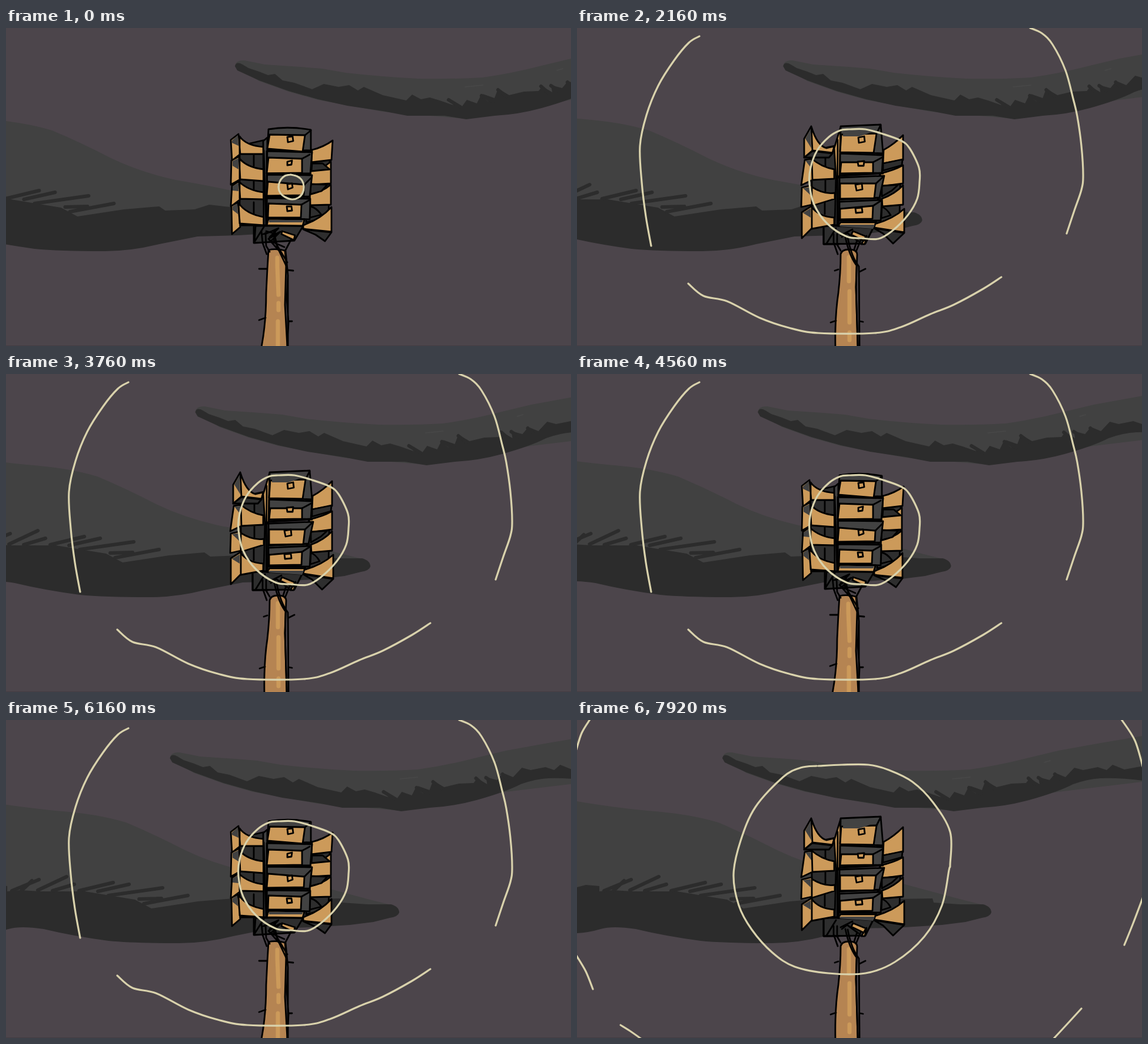
An HTML page for the animation above (8000 ms loop, 960 by 540 pixels).

```html
<!DOCTYPE html>
<html lang="en">
<head>
<meta charset="utf-8">
<title>Siren tower</title>
<style>
html, body { margin: 0; width: 100%; height: 100%; overflow: hidden; background: #4c454b; }
svg { display: block; width: 960px; height: 540px; }
path { stroke-linecap: round; stroke-linejoin: round; }
.tower path { stroke: #000; stroke-width: 2.8; fill: none; }
.tower .wood { fill: #cc9a5a; }
.tower .dark { fill: #2e2e2e; }
.tower .grey { fill: #424242; }
.tower .pole { fill: #b58452; }
.tower .shine { stroke: #cc9a5a; stroke-width: 7; }
.tower .shade { stroke: none; fill: #424242; }
#rings path { fill: none; stroke: #d9d2ac; stroke-width: 3.2; vector-effect: non-scaling-stroke; }
</style>
</head>
<body>
<svg viewBox="0 0 960 540">
  <rect width="960" height="540" fill="#4c454b"/>
  <rect y="539" width="960" height="1" fill="#433d42"/>

  <g id="low">
    <path fill="#414141" d="M0 138Q50 147 120 154Q190 159 240 174Q290 195 340 221Q390 245 450 258Q520 270 557 279L650 304 690 314 600 330 0 330Z"/>
    <path fill="#2c2c2c" d="M0 284L15 280 38 282 38 291 60 289 95 291 170 291 200 296 255 305 283 320 362 308 422 303 432 310 482 308 507 300 542 304 604 303 606 310 650 313 690 313Q704 317 704 327Q702 334 688 336L660 343 620 348 557 352 487 354 422 367Q375 379 330 379Q250 379 210 375Q150 367 100 355Q60 349 40 355Q20 361 0 362Z"/>
    <path fill="none" stroke="#2c2c2c" stroke-width="6" d="M46 290L92 271M62 290L80 273M90 289L139 266M115 290L152 279M160 290L218 276M192 291L245 279M210 298L302 285M270 312L345 298M262 304L300 303"/>
  </g>

  <g id="high">
    <path fill="#414141" d="M389 65Q390 54 405 55L440 62 500 66 537 69 577 76Q640 83 700 86Q760 87 810 84Q860 77 910 64L960 52 1032 39 1110 26V104L960 122 780 154 640 142 530 122 480 108 430 90Z"/>
    <path fill="#2c2c2c" d="M389 65Q391 56 402 62L412 68 430 74 445 80 457 78 470 89 490 93 520 104 540 95 565 100 583 97 598 106 608 100 640 114 680 123 690 113 705 121 720 118 737 123 760 131 752 120 775 133 783 122 800 128 806 116 820 125 810 112 830 119 836 103 855 114 880 108 905 107 911 99 928 109 926 97 945 102 955 90 972 97 987 81 1002 85 1027 80 1042 85 1052 76 1072 84 1110 77V104Q1070 98 1032 99Q1010 100 985 109Q960 122 910 136Q870 147 830 149L782 155 745 149 682 149 640 141 580 132 530 121 480 107 430 89 393 72Z"/>
    <path fill="none" stroke="#2c2c2c" stroke-width="6" d="M752 122L772 134M808 115L828 125M836 105L850 116M909 99L920 109M926 98L938 106M954 92L962 100"/>
    <path fill="none" stroke="#484848" stroke-width="1.5" d="M780 100L810 97M936 72L946 69"/>
  </g>

  <g class="tower">
    <path class="dark" d="M397 200L440 190 443 335 397 335ZM516 205L550 225 548 320 510 330ZM424 336L505 336 490 361 422 365Z"/>
    <path d="M421 215V234M421 256V274M421 296V316M421 337V365L438 338"/>
    <path class="wood" d="M382 190L395 180 398 214 384 225ZM397 184Q408 200 438 202V214H397ZM383 225L396 218 398 257 382 266ZM397 222Q410 237 438 240V260L397 257ZM384 268L396 260 398 291 382 303ZM397 262Q412 276 438 279V291L397 290ZM383 302L394 296 398 338 384 350ZM395 297Q408 316 438 321V335L397 332Z"/>
    <path class="shade" d="M384 191L394 182 395 200 384 195ZM385 226L395 221 395 240 385 234ZM385 269L395 263 395 277 385 276ZM385 303L393 298 394 316 385 309Z"/>
    <path class="wood" d="M520 207Q540 202 555 191L553 224 519 228ZM517 243Q538 239 552 227V264L518 266ZM516 283Q538 278 552 266V300L517 301ZM505 335Q535 324 553 304V346L505 341Z"/>
    <path class="dark" d="M520 230L538 230 550 240 519 243ZM518 265L546 266 536 277 517 282ZM517 303Q526 304 536 317L516 322ZM505 342L553 347 542 362 526 351Z"/>
    <path class="grey" d="M437 192L444 186 443 335H438ZM446 172Q480 166 518 173V208L444 206ZM443 209L520 211 517 248 443 247ZM443 249L520 250 516 286 443 287ZM443 289L517 290 516 325 443 322Z"/>
    <path class="wood" d="M448 181L508 182 504 210 444 205ZM446 220L503 222V246L443 247ZM445 261L507 266 506 284 443 285ZM446 298L502 300 501 322 445 322ZM443 335L446 324 507 325 504 336Z"/>
    <path class="shade" d="M447 326H505L503 330H447Z"/>
    <path d="M508 182L518 174M503 222L516 215M507 266L519 254M502 300L516 292M438 208L442 335M443 247H517M443 287H516"/>
    <path class="wood" stroke-width="3" d="M478 185L487 184 488 192 479 194ZM478 227L486 225 485 232 478 233ZM478 265L486 264 487 271 479 274ZM477 303L485 303 486 310 478 311Z"/>
    <path class="wood" d="M469 345L491 352 489 360 468 350Z"/>
    <path class="pole" d="M446 377Q458 374 474 378L476 400 474 470 478 542H434Q442 500 442 450L444 410Z"/>
    <path class="shine" d="M461 390V405L463 453M463 467V479M462 498V540"/>
    <path d="M475 378L479 420 477 460 480 500 478 540M479 420V540M430 409H443M478 411L488 412M430 496L441 492M480 498H486M434 345L436 365 443 384M441 348L442 370 448 380M455 345L461 372 478 408M484 360L474 379M440 350L463 340 448 355 466 346 450 362 473 372M442 345L460 350 446 358 470 385M437 350L458 343 455 360 478 398"/>
  </g>

  <g class="tower">
    <path class="dark" d="M399 208L438 200 444 335 399 335ZM518 208L550 225 548 320 508 332ZM419 336H505L490 366 419 367Z"/>
    <path d="M422 220V236M422 257V279M421 292V316M419 340V367H445M440 340L424 366"/>
    <path class="wood" d="M386 188L398 167 400 208 386 220ZM398 167Q408 200 424 204L437 201 434 212 400 208ZM387 224L399 222 400 258 381 267ZM399 222Q415 236 437 240V256L400 258ZM382 271L399 267V300L381 304ZM399 270Q420 283 438 280V290L399 302ZM382 313L399 302V340L382 357ZM399 304Q410 320 437 322V334L399 341Z"/>
    <path class="shade" d="M388 188L397 171 398 204ZM388 225L398 224V238ZM384 272L397 270V284ZM384 314L397 306V322Z"/>
    <path class="dark" d="M386 220L400 209 434 213 428 220Z"/>
    <path class="wood" d="M521 207Q538 198 554 182V224L520 230ZM515 247Q538 242 554 233V264L517 269ZM518 290Q540 282 554 267V300L519 303ZM505 333Q536 325 556 307V347L505 339Z"/>
    <path class="dark" d="M520 230L553 223 552 233 520 242ZM518 268L546 266 535 276 518 286ZM518 304Q526 306 533 318L517 323ZM505 340L556 348 537 366 520 349Z"/>
    <path class="wood" d="M437 204L448 168 446 252H440Z"/>
    <path class="grey" d="M440 254H446L444 335H438ZM448 167L516 164 520 213 447 210ZM447 213L520 216 518 246 447 248ZM446 254L522 251 514 288 446 291ZM446 295L518 292 516 327H446Z"/>
    <path class="wood" d="M449 181L509 179 504 212 447 211ZM449 228H503V246L447 247ZM447 264H508L505 289 447 290ZM447 307L503 302 502 324 447 325ZM443 336L448 330 508 330 504 340Z"/>
    <path class="shade" d="M452 178L498 178 480 184 452 184ZM448 334H506L503 341 446 337Z"/>
    <path d="M509 179L516 165M503 228L518 220M508 264L521 252M503 302L517 293M443 190L442 335M446 251L520 247M446 291L515 289"/>
    <path class="wood" d="M478 186L488 184 489 193 479 195ZM477 227L488 226 487 234 478 234ZM473 266L484 264 485 274 475 276ZM473 306L484 305 485 313 474 314Z"/>
    <path class="wood" d="M469 345L491 354 487 361 466 351ZM487 361L492 353 489 367H483Z"/>
    <path class="pole" d="M448 384Q450 376 462 376Q476 376 476 385L474 440 477 542H439Q438 490 444 450Q448 415 448 384Z"/>
    <path class="shine" d="M462 389V430M463 447V500M463 517V530"/>
    <path d="M475 402L474 440 477 540M479 405L480 540M438 412L444 410M480 414L490 409M431 500L440 497M481 498L486 499M436 350V364L443 384M442 350V368L448 378M456 355Q462 385 474 402M460 356Q466 388 479 405M482 360L474 380M476 360L471 376M448 352L468 342M450 355L459 348 478 362"/>
  </g>

  <g id="rings"></g>
</svg>
<script>
const $ = s => document.querySelector(s);

// Smooth curve through points written as "x y x y ..."
function curve(text) {
  const n = text.split(' ').map(Number), p = [];
  for (let i = 0; i < n.length; i += 2) p.push([n[i], n[i + 1]]);
  const at = i => p[Math.max(0, Math.min(p.length - 1, i))];
  let d = 'M' + p[0];
  for (let i = 0; i < p.length - 1; i++) {
    const ctrl = (a, b, c) => [0, 1].map(k => a[k] + (b[k] - c[k]) / 6);
    d += 'C' + [ctrl(at(i), at(i + 1), at(i - 1)), ctrl(at(i + 1), at(i), at(i + 2)), at(i + 1)].join(' ');
  }
  return d;
}
const draw = (lines, move = '') =>
  `<path transform="${move}" d="${lines.map(curve).join('')}"/>`;
const scaled = k => draw(wide, `translate(484 264) scale(${k}) translate(-450 -253)`);

const tiny = ['484 249 474 251 466 259 463 270 466 280 474 287 486 291 497 288 504 280 506 269 503 259 495 252 484 249'];
const mid = ['462 172 447 174 428 185 408 208 397 237 395 265 403 300 425 332 458 354 484 357 512 358 535 345 562 318 578 290 582 262 581 237 565 204 550 191 520 180 490 172 462 172'];
const wide = ['407 78 380 81 350 97 303 148 278 205 266 262 275 315 297 356 332 395 370 419 427 430 490 430 540 411 590 368 620 315 632 255 634 245 634 190 605 140 570 105 530 85 495 76 450 76 410 78'];
const outer = [
  '208 14 190 25 165 55 138 98 118 148 107 200 110 262 117 320 126 370',
  '770 0 790 9 808 28 830 72 843 120 850 150 857 200 860 250 857 275 845 310 832 349',
  '189 434 215 455 255 464 310 492 360 509 410 518 505 518 550 508 600 486 640 470 690 443 721 423'];
const edge = [
  '22 -1 8 22 -1 50', '925 -1 948 35 962 82', '962 300 945 345 930 382',
  '-1 400 15 427 27 457', '74 518 90 528 110 542', '857 490 835 514 809 542'];

const rings = [
  draw(tiny),
  scaled(0.7),
  scaled(1.36) + draw(tiny),
  draw(mid) + draw(outer),
  draw(wide) + draw(edge)
];
const poses = document.querySelectorAll('.tower');
let last = -1;

function tick(now) {
  const step = Math.floor(now % 8000 / 80), t = step * 80;
  if (step !== last) {
    last = step;
    const beat = step >> 1;
    $('#high').setAttribute('transform', `translate(${-t * 0.01793})`);
    $('#low').setAttribute('transform', `translate(${(t - 7920) * 0.0204})`);
    poses.forEach((g, i) => g.style.display = beat % 2 === i ? '' : 'none');
    $('#rings').innerHTML = rings[beat % 5];
  }
  requestAnimationFrame(tick);
}
tick(0);
</script>
</body>
</html>
```
